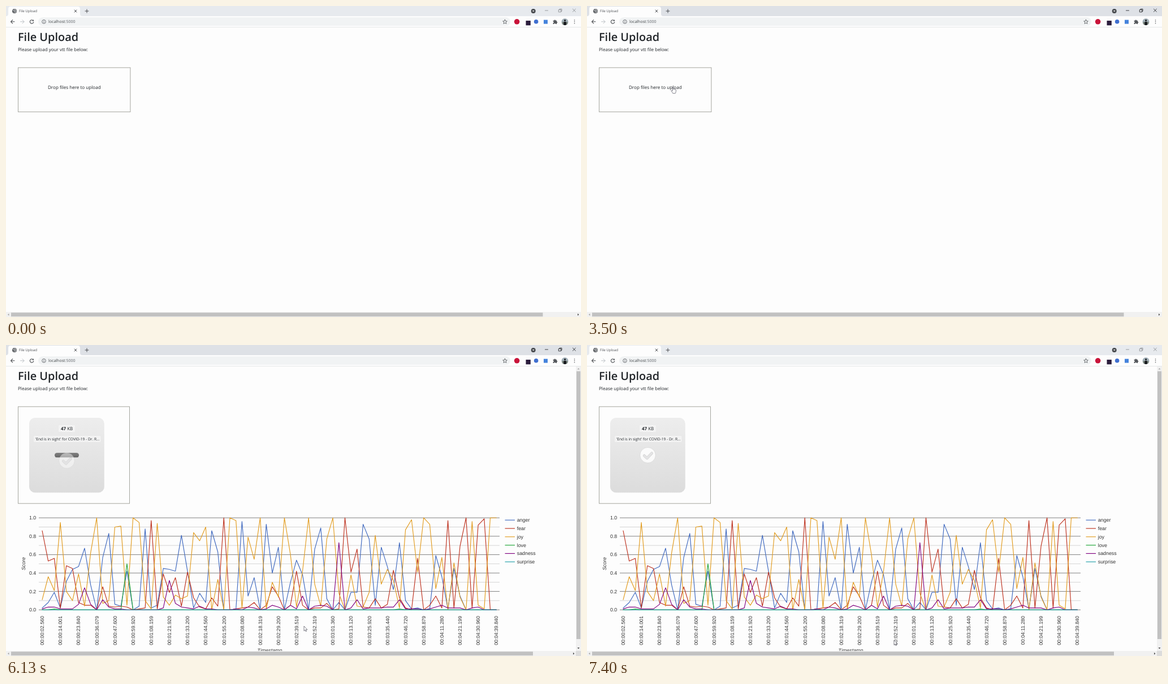
Write an HTML page that moves like this. It is 1017 by 551 pixels and loops after 7.8 s.

```html
<!DOCTYPE html>
<html lang="en">
<head>
<meta charset="utf-8">
<title>File Upload</title>
<style>
  html, body { margin: 0; width: 100%; height: 100%; overflow: hidden; background: #fdfdfd; }
  svg { display: block; width: 100vw; height: 100vh; }
  text { font-family: "Open Sans", "Noto Sans", sans-serif; fill: #212529; text-rendering: geometricPrecision; }
  .chart text { font: 8.9px "Liberation Sans", Arial, sans-serif; fill: #333; }
  .chart .axis { font-style: italic; }
  .line { fill: none; stroke-linecap: round; stroke-linejoin: round; }
</style>
</head>
<body>
<svg id="stage" viewBox="0 0 1017 551">
  <defs>
    <linearGradient id="tile" x2="0" y2="1"><stop stop-color="#ededed"/><stop offset="1" stop-color="#dcdcdc"/></linearGradient>
    <linearGradient id="fill" x2="0" y2="1"><stop stop-color="#666"/><stop offset="1" stop-color="#444"/></linearGradient>
    <clipPath id="barClip"><rect x="86" y="191" width="43" height="8.4" rx="4.2"/></clipPath>
    <clipPath id="face"><circle cx="988.5" cy="28" r="6"/></clipPath>
  </defs>
  <rect width="1017" height="551" fill="#fdfdfd"/>

  <!-- page -->
  <text x="21" y="62" font-size="19.9" font-weight="600">File Upload</text>
  <text x="21" y="80.3" font-size="8.07">Please upload your vtt file below:</text>
  <rect id="zone" x="21.5" y="109.2" fill="none" stroke="#a5a69f"/>
  <text id="hint" x="120.8" y="146.8" font-size="8.08" text-anchor="middle">Drop files here to upload</text>

  <g id="preview">
    <rect x="41" y="129" width="132.8" height="132.6" rx="10.6" fill="url(#tile)"/>
    <g fill="#fff" fill-opacity=".42">
      <rect x="93" y="142" width="29" height="12" rx="1.6"/>
      <rect x="49" y="161" width="118.5" height="11" rx="1.6"/>
    </g>
    <text x="107.6" y="150.9" font-size="7.95" text-anchor="middle"><tspan font-weight="700">47</tspan> KB</text>
    <text x="51.8" y="169" font-size="6.65">'End is in sight' for COVID-19 - Dr. R...</text>
    <g id="bar" clip-path="url(#barClip)">
      <rect x="86" y="191" width="43" height="8.4" fill="#fff" fill-opacity=".9"/>
      <rect id="level" x="86" y="191" height="8.4" fill="url(#fill)"/>
    </g>
    <g id="mark">
      <circle r="13.7" fill="#fff" fill-opacity=".82" stroke="#747474" stroke-opacity=".2" stroke-width=".8"/>
      <g class="line" stroke-linecap="round">
        <path d="M-6.2 .9L-1.4 5.4L7 -3.4" stroke="#c9c9c9" stroke-width="4.7"/>
        <path d="M-6.2 .9L-1.4 5.4L7 -3.4" stroke="#e4e4e5" stroke-width="3.7"/>
      </g>
    </g>
  </g>

  <g id="chart" class="chart"></g>

  <!-- scrollbars -->
  <rect y="542" width="1017" height="9" fill="#f1f1f1"/>
  <rect id="thumb" x="9" y="543.3" height="6.8" fill="#c1c1c1"/>
  <path d="M5.4 544.8v4l-2.4-2z" fill="#a3a3a3"/>
  <path id="right" d="M-1 -2v4l2.4-2z" fill="#505050"/>
  <g id="vbar">
    <rect x="1008" y="38" width="9" height="504" fill="#f1f1f1"/>
    <rect x="1009" y="46.5" width="7" height="474.5" fill="#c1c1c1"/>
    <path d="M1010.5 43.3h4l-2-2.4z" fill="#a3a3a3"/>
    <path d="M1010.5 536h4l-2 2.4z" fill="#505050"/>
    <rect x="1008" y="542" width="9" height="9" fill="#dcdcdc"/>
  </g>

  <!-- browser -->
  <rect id="title" width="1017" height="18"/>
  <rect y="18" width="1017" height="19.5" fill="#fdfdfd"/>
  <path d="M0 37.6H1017" stroke="#dfe1e3" stroke-width=".8"/>
  <path d="M0 18q4 0 4-4V5q0-4 4-4H127q4 0 4 4V14q0 4 4 4z" fill="#fdfdfd"/>
  <circle cx="15" cy="9" r="4" fill="#5a5d61"/>
  <path d="M12.3 7.4l2.4.5l.4 1.5l-1.3 1.2M15.4 5.8l.5 1.5l2 .4M16 11.6l.3-1.5l1.8-.4" class="line" stroke="#e8eaed" stroke-width=".9"/>
  <text x="23" y="11.2" font-size="6.14" style="fill:#4a4d51">File Upload</text>
  <g class="line" stroke="#4a4d51">
    <path d="M121 7l4 4M125 7l-4 4"/>
    <path d="M140 9h6M143 6v6"/>
    <path d="M15 27.8H8.6M11.6 24.7L8.5 27.8l3.1 3.1" stroke-width="1.1"/>
    <path d="M25.5 27.8H32M29 24.7l3.1 3.1L29 30.9" stroke="#bdc1c6"/>
    <path d="M48.1 25.9A3.2 3.2 0 1 0 48.7 28.6" stroke-width="1.1"/>
    <path d="M48.9 24v2.7h-2.8z" fill="#4a4d51" stroke="none"/>
  </g>
  <rect x="57" y="20.3" width="835" height="14.8" rx="7.4" fill="#f1f3f4"/>
  <circle cx="67" cy="27.8" r="3.3" fill="none" stroke="#5f6368" stroke-width=".9"/>
  <path d="M67 25.7v.9M67 27.3v2.4" stroke="#5f6368" stroke-width=".9"/>
  <text x="75" y="30.2" font-size="7.05" style="fill:#3c4043">localhost<tspan fill="#5f6368">:5000</tspan></text>
  <path d="M882.5 24.2l1.1 2.5l2.7.2l-2 1.8l.6 2.7l-2.4-1.4l-2.4 1.4l.6-2.7l-2-1.8l2.7-.2z" class="line" stroke="#4a4d51" stroke-width=".8"/>
  <circle cx="903.6" cy="27.8" r="4.8" fill="#c9143a"/>
  <rect x="919.5" y="26" width="8.3" height="8.3" fill="#2c1d3d"/>
  <circle cx="937.6" cy="27.8" r="3.8" fill="#3f6fd0"/>
  <rect x="951" y="24.6" width="7" height="7" fill="#4583dc"/>
  <path d="M967.6 25.7h1.9a1.3 1.3 0 0 1 2.6 0h1.9v2a1.3 1.3 0 0 1 0 2.6v1.7h-2a1.2 1.2 0 0 0-2.4 0h-2v-2a1.2 1.2 0 0 0 0-2.4z" fill="#55585c"/>
  <g clip-path="url(#face)">
    <rect x="982" y="21" width="13" height="14" fill="#a3b1ba"/>
    <path d="M982 34l2-6h9l2 6z" fill="#7d8780"/>
    <circle cx="988.6" cy="25.6" r="1.5" fill="#15171a"/>
    <path d="M986.3 35v-6q2.3-3 4.6 0v6z" fill="#15171a"/>
  </g>
  <path d="M1005.5 24.9v.01M1005.5 27.8v.01M1005.5 30.7v.01" class="line" stroke="#4a4d51" stroke-width="1.5"/>
  <circle cx="932.7" cy="9" r="4" fill="#4a4d51"/>
  <path d="M930.9 8.1h3.6l-1.8 2.2z" fill="#f4f5f6"/>
  <path id="controls" class="line" stroke-width=".9" d="M953.5 8h5M977.7 6.7h4v4h-4zM979 6.5v-1.2h4v4h-1.2M1002.4 5.2l5 5M1007.4 5.2l-5 5"/>

  <!-- pointer, tip at 0,0 -->
  <g id="pointer" fill="#fff" stroke="#4b4b58" stroke-width=".7" stroke-linejoin="round">
    <path id="arrow" d="M0 0v8.6l2-1.8l1.3 2.9l1.3-.6l-1.3-2.8h2.7z"/>
    <path id="hand" d="M-.8 .6q.8-1 1.6 0v4l.2-.6q1-.6 1.5.3q1-.4 1.4.5q1-.3 1.4.7v3q-.2 1.7-1.2 3.3h-4.2q-1-2.2-3-4.2q.2-1.5 1.6-.8l.7.8z"/>
  </g>
</svg>
<script>
const LOOP = 7800, ADDED = 3570, DONE = 5970;
const $ = id => document.getElementById(id);
const clamp = v => Math.max(0, Math.min(1, v));
const smooth = p => p * p * (3 - 2 * p);
const show = (id, on) => $(id).setAttribute('display', on ? 'inline' : 'none');
const set = (id, attrs) => { for (const k in attrs) $(id).setAttribute(k, attrs[k]); };

function add(parent, tag, attrs, text) {
  const el = document.createElementNS('http://www.w3.org/2000/svg', tag);
  for (const k in attrs) el.setAttribute(k, attrs[k]);
  if (text) el.textContent = text;
  parent.appendChild(el);
}

// Scores in percent; the six emotions add up to 100 at every step.
const anger = [
  2, 8, 19, 2, 31, 44, 47, 67, 27, 0,
  57, 83, 6, 4, 42, 0, 4, 88, 2, 5,
  45, 44, 42, 81, 42, 2, 18, 8, 86, 63,
  0, 0, 1, 96, 15, 35, 0, 93, 40, 68,
  0, 30, 54, 38, 0, 66, 89, 12, 0, 8,
  0, 19, 19, 93, 77, 5, 68, 47, 22, 73,
  10, 1, 2, 0, 1, 59, 36, 1, 45, 15,
  0, 0, 0, 0, 0, 0];
const fear = [
  86, 53, 56, 2, 48, 45, 8, 5, 5, 0,
  25, 4, 3, 4, 3, 0, 1, 2, 97, 1,
  39, 19, 35, 4, 41, 13, 3, 1, 13, 4,
  100, 0, 1, 2, 3, 8, 0, 5, 25, 15,
  0, 5, 42, 5, 0, 2, 2, 7, 0, 1,
  100, 41, 66, 3, 2, 12, 2, 6, 43, 13,
  2, 0, 56, 0, 5, 15, 2, 97, 2, 69,
  100, 2, 92, 99, 0, 0];
const sadness = [
  1, 3, 3, 1, 1, 1, 6, 24, 6, 0,
  11, 3, 1, 1, 0, 0, 0, 0, 0, 0,
  2, 32, 7, 3, 2, 1, 4, 1, 1, 0,
  0, 0, 1, 0, 3, 2, 0, 1, 5, 3,
  0, 5, 1, 15, 0, 4, 5, 4, 0, 73,
  0, 2, 11, 1, 2, 2, 2, 3, 3, 11,
  1, 1, 1, 0, 1, 3, 5, 2, 2, 2,
  0, 2, 3, 0, 0, 0];
const love = anger.map((_, i) => i === 14 ? 50 : i === 2 || i === 59 ? 1 : 0);
const joy = anger.map((a, i) => Math.max(0, 100 - a - fear[i] - sadness[i] - love[i]));
const surprise = anger.map(() => 0);

const series = [
  ['anger', '#3e68bf', anger], ['fear', '#bd301d', fear], ['joy', '#e29c1f', joy],
  ['love', '#22a63a', love], ['sadness', '#80007f', sadness], ['surprise', '#1f9fa8', surprise]];
const stamps = ('00:02.560 00:14.001 00:23.840 00:36.079 00:47.600 00:59.920 01:08.159 01:21.920 01:33.200 ' +
  '01:44.560 01:55.200 02:08.080 02:18.319 02:29.200 02:39.519 02:52.319 03:01.360 03:13.120 03:25.920 ' +
  '03:35.440 03:46.720 03:58.879 04:11.280 04:21.199 04:30.960 04:39.840').split(' ');

function buildChart() {
  const g = $('chart');
  const px = i => 64 + i * 10.71, py = v => 469.2 - v * 1.63;
  for (let v = 0; v <= 100; v += 10) {
    const major = v % 20 === 0;
    add(g, 'path', { d: `M58 ${py(v)}H873`, stroke: major ? '#808080' : '#c9c9c9', 'stroke-width': major ? 1 : .8 });
    if (major) add(g, 'text', { x: 53.3, y: py(v) + 3, 'text-anchor': 'end' }, (v / 100).toFixed(1));
  }
  series.forEach(([name, color, data], n) => {
    const y = 310.2 + n * 14.8;
    const points = data.map((v, i) => px(i).toFixed(1) + ',' + py(v).toFixed(1)).join(' ');
    add(g, 'polyline', { points, class: 'line', stroke: color, 'stroke-width': 1.15 });
    add(g, 'path', { d: `M882.5 ${y}H900`, stroke: color, 'stroke-width': 1.15 });
    add(g, 'text', { x: 903.7, y: y + 3 }, name);
  });
  stamps.forEach((s, i) => add(g, 'text',
    { transform: `translate(${px(i * 3) + 3.2} 480) rotate(-90)`, 'text-anchor': 'end' }, '00:' + s));
  add(g, 'text', { transform: 'translate(34 387.5) rotate(-90)', 'text-anchor': 'middle', class: 'axis' }, 'Score');
  add(g, 'text', { x: 466.5, y: 544, 'text-anchor': 'middle', class: 'axis' }, 'Timestamp');
}

// Pointer stops: time, x, y
const path = [
  [800, 944, 293], [1400, 152, 143], [3850, 152, 143], [4270, 271, 187], [4370, 271, 187],
  [5130, 514, 456], [5230, 514, 456], [5530, 527, 498], [6230, 527, 498], [6630, 543, 523]];

function pointerAt(t) {
  const i = path.findIndex(p => p[0] > t);
  if (i < 1) return path[path.length - 1].slice(1);
  const [t0, x0, y0] = path[i - 1], [t1, x1, y1] = path[i];
  const k = smooth((t - t0) / (t1 - t0));
  return [x0 + (x1 - x0) * k, y0 + (y1 - y0) * k];
}

function draw(t) {
  const added = t >= ADDED;
  const active = (t >= 1900 && t < 2130) || (t >= 3500 && t < 7400);
  set('title', { fill: active ? '#dee1e6' : '#e7eaee' });
  set('controls', { stroke: active ? '#26282b' : '#8d9093' });

  set('zone', { width: added ? 197 : 198.4, height: added ? 171.6 : 78.4 });
  set('thumb', { width: added ? 923 : 940.5 });
  set('right', { transform: `translate(${added ? 1004 : 1012} 546.8)` });
  show('hint', !added);
  show('preview', added);
  show('vbar', added);
  show('chart', t >= DONE);

  set('level', { width: 43 * smooth(clamp((t - 3700) / 300)) });
  set('bar', { opacity: 1 - clamp((t - DONE) / 400) ** 1.7 });
  const rise = 1 - (1 - clamp((t - DONE) / 900)) ** 4;
  set('mark', { opacity: rise, transform: `translate(107.5 ${195.2 + 21 * (1 - rise)})` });

  const [x, y] = pointerAt(t);
  const hand = !added && x < 220 && y > 109 && y < 188;
  show('pointer', t >= 800);
  show('hand', hand);
  show('arrow', !hand);
  set('pointer', { transform: `translate(${x} ${y})` });
}

buildChart();
function tick() {
  draw(performance.now() % LOOP);
  requestAnimationFrame(tick);
}
tick();
</script>
</body>
</html>
```
